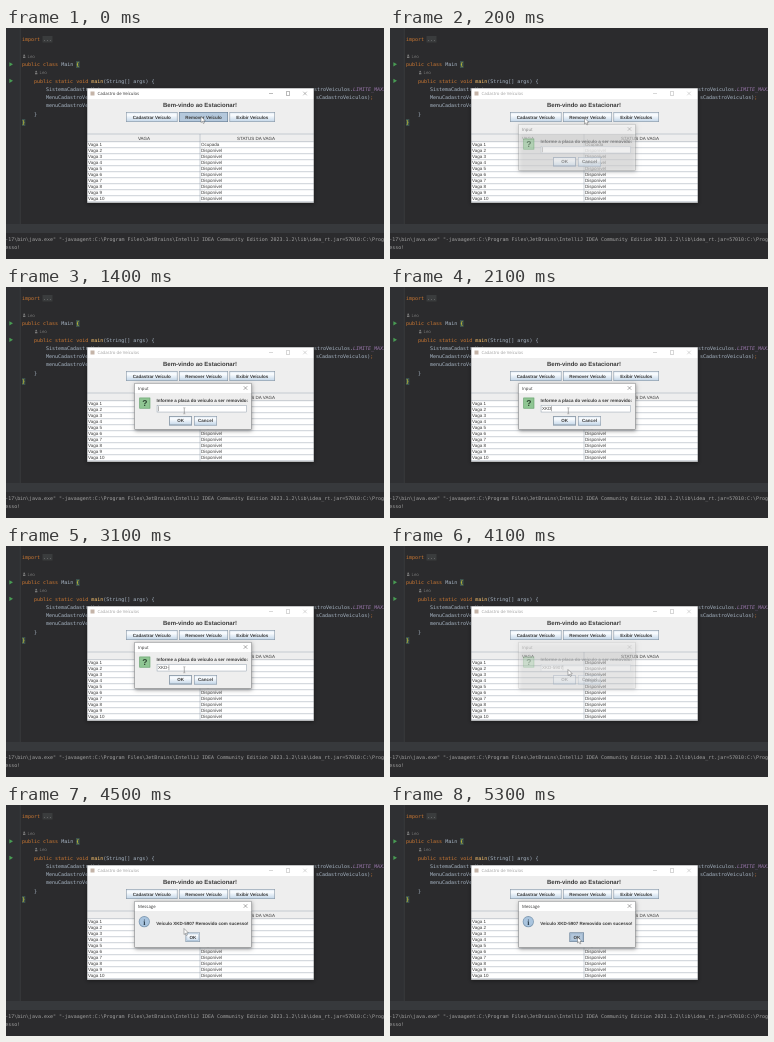
Animation of 378x231 px, one loop 5400 ms. Source, as an HTML page with a canvas:

```html
<!DOCTYPE html>
<html lang="pt-BR">
<head>
<meta charset="utf-8">
<title>Cadastro de Veículos</title>
<style>
html, body { margin: 0; width: 100%; height: 100%; overflow: hidden; background: #2b2b2d; }
canvas { display: block; width: 378px; height: 231px; }
</style>
</head>
<body>
<canvas id="stage"></canvas>
<script>
const W = 378, H = 231, LOOP = 5400, STEP = 100;
const canvas = document.getElementById('stage');
const ratio = Math.max(1, window.devicePixelRatio || 1);
canvas.width = W * ratio;
canvas.height = H * ratio;
const ctx = canvas.getContext('2d');
ctx.scale(ratio, ratio);
ctx.textRendering = 'geometricPrecision';

const UI = '"Liberation Sans", Arial, sans-serif';
const MONO = '"DejaVu Sans Mono", monospace';
const TITLE = '"Open Sans", "Noto Sans", sans-serif';
const PLAIN = `4.5px ${UI}`, BOLD = `bold 4.5px ${UI}`;
const CODE = `5px ${MONO}`;
const PANEL = '#eeeeee', EDGE = '#8a98a6', GRID = '#9aa5b0', INK = '#3a3a3a';
const INPUT = '#a9b7c6', KEY = '#cc7832', DIM = '#787878';
const PLATE = 'XKD-5907';

function rect(x, y, w, h, fill) {
  ctx.fillStyle = fill;
  ctx.fillRect(x, y, w, h);
}

function frame(x, y, w, h, color, line = 0.6) {
  ctx.strokeStyle = color;
  ctx.lineWidth = line;
  ctx.strokeRect(x + line / 2, y + line / 2, w - line, h - line);
}

function line(x1, y1, x2, y2, color, width = 0.5) {
  ctx.strokeStyle = color;
  ctx.lineWidth = width;
  ctx.beginPath();
  ctx.moveTo(x1, y1);
  ctx.lineTo(x2, y2);
  ctx.stroke();
}

// y is the vertical middle of capital letters
function text(str, x, y, font, color, align = 'left') {
  ctx.font = font;
  ctx.fillStyle = color;
  ctx.textAlign = align;
  const size = parseFloat(font.match(/([\d.]+)px/)[1]);
  ctx.fillText(str, x, y + size * 0.36);
}

function shape(points, fill) {
  ctx.fillStyle = fill;
  ctx.beginPath();
  points.forEach(([x, y]) => ctx.lineTo(x, y));
  ctx.closePath();
  ctx.fill();
}

function disc(x, y, r, fill) {
  ctx.fillStyle = fill;
  ctx.beginPath();
  ctx.arc(x, y, r, 0, Math.PI * 2);
  ctx.fill();
}

// parts: alternating text and colour
function code(x, y, ...parts) {
  for (let i = 0; i < parts.length; i += 2) {
    text(parts[i], x, y, CODE, parts[i + 1]);
    x += ctx.measureText(parts[i]).width;
  }
}

function author(x, y) {
  disc(x + 2.2, y - 1, 0.9, DIM);
  rect(x + 1, y + 0.2, 2.4, 1.5, DIM);
  text('Leo', x + 5.6, y, `4.4px ${TITLE}`, DIM);
}

function editor() {
  rect(0, 0, W, H, '#2b2b2d');
  rect(0, 0, 14, 196, '#2f3033');
  line(14.3, 0, 14.3, 196, '#45484a');
  for (const y of [36.3, 52.8]) {
    shape([[3.4, y - 2.1], [7, y], [3.4, y + 2.1]], '#499c54');
  }

  rect(36.5, 8, 10, 6.5, '#3a3c3d');
  code(16, 11.1, 'import ', KEY, '...', '#8c8c8c');
  author(16, 28.3);
  rect(70, 33, 3.6, 7, '#3b514d');
  code(16, 36.3, 'public class ', KEY, 'Main ', INPUT, '{', '#ffef28');
  author(28, 44.6);
  code(28, 52.8, 'public static void ', KEY, 'main', '#ffc66d', '(String[] args) {', INPUT);
  code(40, 61.2, 'SistemaCadastroVei', INPUT);
  code(40, 69.5, 'MenuCadastroVeicul', INPUT);
  code(40, 77.6, 'menuCadastroVeicul', INPUT);
  code(308, 61.2, 'stroVeiculos.', INPUT);
  text('LIMITE_MAXIMO', 347, 61.2, 'italic ' + CODE, '#9876aa');
  code(310, 69.5, 'sCadastroVeiculos)', INPUT, ';', KEY);
  code(28, 85.8, '}', INPUT);
  rect(16, 91, 3.3, 7, '#3b514d');
  code(16, 94.2, '}', '#ffef28');

  rect(0, 196, W, 9, '#37393c');
  const out = `4.97px ${MONO}`;
  text(String.raw`-17\bin\java.exe" "-javaagent:C:\Program Files\JetBrains\IntelliJ IDEA Community Edition 2023.1.2\lib\idea_rt.jar=57010:C:\Program`,
    -0.8, 210.9, out, '#a2a2a2');
  text('esso!', -0.8, 219.2, out, '#a2a2a2');
}

function button(label, x, y, w, h, down = false) {
  if (down) {
    rect(x, y, w, h, '#b4c8dc');
  } else {
    const g = ctx.createLinearGradient(0, y, 0, y + h);
    g.addColorStop(0, '#dde8f3');
    g.addColorStop(0.3, '#fbfdff');
    g.addColorStop(1, '#c0d4e7');
    ctx.fillStyle = g;
    ctx.fillRect(x, y, w, h);
  }
  frame(x, y, w, h, down ? '#647a90' : EDGE);
  text(label, x + w / 2, y + h / 2, BOLD, INK, 'center');
}

function cross(x, y, color) {
  line(x - 1.8, y - 1.8, x + 1.8, y + 1.8, color);
  line(x - 1.8, y + 1.8, x + 1.8, y - 1.8, color);
}

function shadow(x, y, w, h) {
  ctx.save();
  ctx.shadowColor = 'rgba(0,0,0,.4)';
  ctx.shadowBlur = 4 * ratio;
  ctx.shadowOffsetY = ratio;
  rect(x, y, w, h, PANEL);
  ctx.restore();
}

function mainWindow(active, pressed, taken) {
  const x = 81, y = 60, w = 227, h = 115, mid = 194;
  const tone = active ? '#333333' : '#a0a0a0';
  const controls = active ? '#777777' : '#b0b0b0';
  shadow(x, y, w, h);
  rect(x, y, w, 11, '#ffffff');
  rect(84.5, 63.5, 4, 4, '#c4b4a8');
  text('Cadastro de Veículos', 91.5, 65.5, `4.3px ${TITLE}`, tone);
  line(263, 65.5, 267, 65.5, controls);
  frame(280, 63.5, 4, 4, controls, 0.5);
  cross(299, 65.5, controls);

  text('Bem-vindo ao Estacionar!', mid, 76.4, `bold 6px ${UI}`, INK, 'center');
  button('Cadastrar Veículo', 120, 84, 51.5, 10);
  button('Remover Veículo', 173, 84, 49, 10, pressed);
  button('Exibir Veículos', 223.5, 84, 45.5, 10);

  line(x, 106, x + w, 106, GRID);
  text('VAGA', 138, 110.1, PLAIN, INK, 'center');
  text('STATUS DA VAGA', 250, 110.1, PLAIN, INK, 'center');
  rect(x, 114, w, 60, '#ffffff');
  for (let i = 0; i < 10; i++) {
    const top = 113.7 + i * 6;
    line(x, top, x + w, top, GRID);
    text('Vaga ' + (i + 1), 82, top + 3.1, PLAIN, INK);
    text(i === 0 && taken ? 'Ocupada' : 'Disponível', 195, top + 3.1, PLAIN, INK);
  }
  line(x, 173.7, x + w, 173.7, GRID);
  line(mid, 106, mid, 173.7, GRID);
  frame(x, y, w, h, '#6f7173', 0.4);
}

function dialog(title, alpha, body) {
  ctx.save();
  ctx.globalAlpha = alpha;
  shadow(128.5, 96, 117, 46.5);
  rect(128.5, 96, 117, 10, '#ffffff');
  text(title, 132, 101, `4.3px ${TITLE}`, '#333333');
  cross(239.5, 101, '#555555');
  body();
  frame(128.5, 96, 117, 46.5, '#77797b', 0.5);
  ctx.restore();
}

function inputDialog(alpha, typed, caret) {
  dialog('Input', alpha, () => {
    rect(133.4, 110.7, 10.8, 10.8, '#8fc693');
    frame(133.4, 110.7, 10.8, 10.8, '#6ba272');
    text('?', 138.8, 116.2, `bold 8.5px ${UI}`, '#2c4431', 'center');
    text('Informe a placa do veículo a ser removido:', 150.6, 113.8, BOLD, INK);
    rect(150.8, 118, 90, 7.3, '#ffffff');
    frame(150.8, 118, 90, 7.3, EDGE, 0.5);
    text(typed, 151.9, 121.6, PLAIN, INK);
    if (caret) {
      ctx.font = PLAIN;
      rect(152 + ctx.measureText(typed).width, 119.2, 0.4, 5, INK);
    }
    button('OK', 163, 129, 23, 9.5);
    frame(163.4, 129.4, 22.2, 8.7, EDGE);
    button('Cancel', 188, 129, 23, 9.5);
  });
}

function messageDialog(alpha, pressed) {
  dialog('Message', alpha, () => {
    disc(138.3, 116.7, 5.6, '#7f9ab3');
    disc(138.3, 116.7, 4.8, '#a9c4de');
    text('i', 138.3, 116.7, `bold 8px "Liberation Serif", serif`, '#2f4152', 'center');
    text(`Veículo ${PLATE} Removido com sucesso!`, 150.3, 117.9, BOLD, INK);
    button('OK', 179.5, 127.5, 14.5, 9.5, pressed);
    frame(180.7, 128.7, 12.1, 7.1, '#8aa6c1', 0.4);
  });
}

function arrow(x, y) {
  const p = [[0, 0], [0, 6], [1.4, 4.8], [2.4, 7], [3.4, 6.5], [2.5, 4.4], [4.3, 4.3]]
    .map(([dx, dy]) => [x + dx, y + dy]);
  shape(p, '#ffffff');
  ctx.strokeStyle = '#444444';
  ctx.lineWidth = 0.4;
  ctx.stroke();
}

function beam(x, y) {
  line(x, y - 3, x, y + 3, '#666666');
  line(x - 1.2, y - 3, x + 1.2, y - 3, '#888888', 0.4);
  line(x - 1.2, y + 3, x + 1.2, y + 3, '#888888', 0.4);
}

// [time, x, y]
const path = [
  [100, 195, 88.5], [200, 194.5, 90], [300, 190, 102], [400, 181.5, 119], [500, 178, 125],
  [600, 183, 129], [700, 178, 123.5], [4600, 178, 123.5], [5000, 187.5, 132]
];
// [time, characters typed]
const keys = [[1700, 1], [1900, 2], [2100, 3], [2600, 4], [3200, 5], [3300, 6], [3400, 7], [3600, 8]];

function pointer(t) {
  if (t <= path[0][0]) return path[0].slice(1);
  for (let i = 1; i < path.length; i++) {
    const [t0, x0, y0] = path[i - 1], [t1, x1, y1] = path[i];
    if (t <= t1) {
      const k = (t - t0) / (t1 - t0), s = k * k * (3 - 2 * k);
      return [x0 + (x1 - x0) * s, y0 + (y1 - y0) * s];
    }
  }
  return path[path.length - 1].slice(1);
}

function draw(t) {
  const asking = t >= 200 && t < 4200;
  const telling = t >= 4300;
  editor();
  // the main window only regains focus once both dialogs are gone
  mainWindow(t < 200, t < 100, t < 4100);
  if (asking) {
    const alpha = t < 300 ? 0.55 : t >= 4100 ? 0.3 : 1;
    const typed = keys.filter(([at]) => t >= at).length;
    inputDialog(alpha, PLATE.slice(0, typed), t < 900 || t >= 1400);
  }
  if (telling) messageDialog(t < 4400 ? 0.55 : 1, t >= 5200);
  const [x, y] = pointer(t);
  if (t >= 700 && t < 4100) beam(178.3, 123.8);
  else arrow(x, y);
}

const start = performance.now();
let last = -1;
function tick() {
  const t = Math.floor(((performance.now() - start) % LOOP) / STEP) * STEP;
  if (t !== last) draw(last = t);
  requestAnimationFrame(tick);
}
draw(0);
requestAnimationFrame(tick);
</script>
</body>
</html>
```
